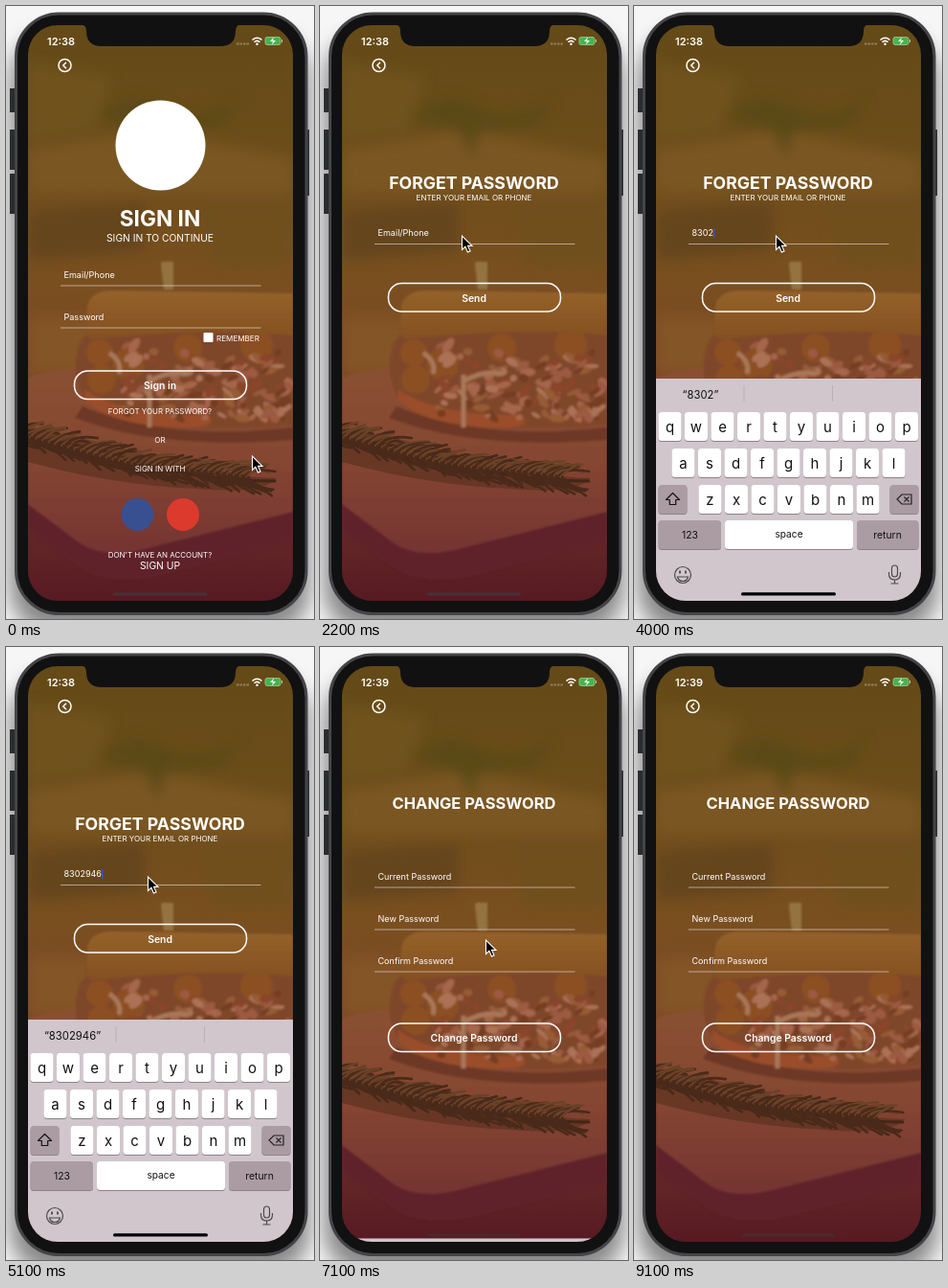
Recreate the animation shown at these times as an HTML page. Size 322 by 640 pixels, loop 9.2 s.

```html
<!DOCTYPE html>
<html lang="en">
<head>
<meta charset="utf-8">
<title>Sign in flow</title>
<style>
html, body { margin: 0; width: 100%; height: 100%; overflow: hidden; background: #f6f6f6; }
svg { display: block; width: 322px; height: 640px; font-family: Inter, Roboto, sans-serif; fill: #fff; }
.line { stroke: #fff; stroke-opacity: .5; fill: none; }
.button { fill: none; stroke: #fff; stroke-width: 1.5; }
.ink { fill: #111; }
.icon { fill: none; stroke: #4e484c; stroke-width: 1.2; }
</style>
</head>
<body>
<svg viewBox="0 0 322 640">
  <defs>
    <clipPath id="glass"><rect x="23" y="20" width="277" height="601" rx="31"/></clipPath>
    <linearGradient id="tone" x2="0" y2="1">
      <stop offset="0" stop-color="#644a18"/>
      <stop offset=".22" stop-color="#6c4d1a"/>
      <stop offset=".45" stop-color="#7a4f20"/>
      <stop offset=".62" stop-color="#7b4528"/>
      <stop offset=".85" stop-color="#672a29"/>
      <stop offset="1" stop-color="#571a22"/>
    </linearGradient>
    <linearGradient id="wood" x2="0" y2="1">
      <stop offset="0" stop-color="#8a5130"/>
      <stop offset=".5" stop-color="#854632"/>
      <stop offset="1" stop-color="#753433"/>
    </linearGradient>
    <linearGradient id="bun" x2="0" y2="1">
      <stop offset="0" stop-color="#94622a"/>
      <stop offset="1" stop-color="#845022"/>
    </linearGradient>
    <filter id="far" x="-50%" y="-50%" width="200%" height="200%"><feGaussianBlur stdDeviation="7"/></filter>
    <filter id="near" x="-20%" y="-20%" width="140%" height="140%"><feGaussianBlur stdDeviation="1.3"/></filter>
    <filter id="soft" x="-20%" y="-50%" width="140%" height="200%"><feGaussianBlur stdDeviation=".6"/></filter>
    <filter id="shade" x="-20%" y="-20%" width="140%" height="140%"><feGaussianBlur stdDeviation="11"/></filter>
    <g id="photo">
      <rect x="23" y="20" width="277" height="601" fill="url(#tone)"/>
      <g filter="url(#far)">
        <path d="M23 60L110 75L90 130L23 140Z" fill="#70531f"/>
        <path d="M23 150L150 130L300 160V195L23 195Z" fill="#7a5722"/>
        <path d="M95 115Q130 85 165 105T245 95L225 125L165 130L160 160L145 130Z" fill="#5a4918"/>
        <path d="M23 215L145 205V255L23 265Z" fill="#65451a"/>
        <path d="M200 205H300V270H215Z" fill="#70501f"/>
        <path d="M23 325H90V385H23Z" fill="#845528"/>
      </g>
      <g filter="url(#near)">
        <path d="M23 500H300V560L150 597Q105 603 80 588L23 548Z" fill="#602429"/>
        <path d="M23 388Q50 378 90 378L300 385V528L140 568Q100 577 76 560L23 520Z" fill="url(#wood)"/>
        <path d="M80 418Q170 455 300 440V453Q160 464 72 430Z" fill="#6e3828"/>
        <path d="M76 355Q82 338 110 338L300 330V437Q170 449 94 421Q64 395 76 355Z" fill="#7f472b"/>
        <path d="M82 400Q120 428 212 427Q222 440 194 440Q110 440 82 411Z" fill="#9a4d2a"/>
        <g id="filling"></g>
        <path d="M85 314Q88 297 112 297L300 300V344Q220 335 88 348Q83 340 85 314Z" fill="url(#bun)"/>
        <path d="M162 270Q162 266 167 267H175V296H165Z" fill="#957340"/>
      </g>
      <g id="herb" fill="none" stroke-linecap="round" filter="url(#soft)"></g>
    </g>
  </defs>

  <rect width="322" height="640" fill="#f6f6f6"/>
  <rect x="4" y="30" width="314" height="625" rx="46" fill="#000" opacity=".45" filter="url(#shade)"/>
  <path d="M4 86h7v25h-7zM4 129h7v42h-7zM4 175h7v42h-7zM312 129h5v69h-5z" fill="#2b2c2e"/>
  <rect x="10.5" y="8" width="303.5" height="626.500" rx="45" fill="#111" stroke="#444548" stroke-width="3"/>

  <g clip-path="url(#glass)">
    <g id="login"></g>
    <g id="forget"></g>
    <g id="change"></g>
    <rect id="homeDim" x="112" y="612.5" width="98" height="3" rx="1.5" fill="#433337"/>
    <g id="keyboard"></g>
  </g>

  <path d="M78 19Q84 20 84 26Q84 42 100 42H224Q240 42 240 26Q240 20 246 19Z" fill="#111"/>
  <text id="clock" x="43" y="41" font-size="11" font-weight="600"></text>
  <path d="M241 39.5h13" stroke="#fff" stroke-opacity=".3" stroke-width="2" stroke-dasharray="2.5 1"/>
  <path d="M257.500 35.500Q262.500 31 267.500 35.500M259.500 37.700Q262.500 35 265.500 37.700" fill="none" stroke="#fff" stroke-width="1.5"/>
  <circle cx="262.500" cy="39.800" r="1.200"/>
  <rect x="271" y="32.500" width="16" height="8" rx="2" fill="#43b54c" stroke="#b7d3a5" stroke-width=".7"/>
  <path d="M288.500 35v3" stroke="#b7d3a5"/>
  <path d="M280 32.500L276 37H279L278 40.500L282 36H279Z"/>
  <path id="pointer" d="M0 0V14.500L3.400 11.300L5.900 17L8.500 15.900L6 10.400H10.500Z" fill="#000" stroke="#fff" stroke-width="1.100"/>
</svg>
<script>
const $ = id => document.getElementById(id);
const PERIOD = 9200, WIDTH = 277, KB_HEIGHT = 232;
const DIGITS = "8302946", TYPE_START = 3300, TYPE_STEP = 230;

let seed = 7;
const rand = (a, b) => a + (b - a) * ((seed = seed * 16807 % 2147483647) / 2147483647);

const text = (x, y, size, str, extra = "") =>
  `<text x="${x}" y="${y}" font-size="${size}" ${extra}>${str}</text>`;
const mid = (y, size, str, weight = 400) =>
  text(161, y, size, str, `text-anchor="middle" font-weight="${weight}"`);
const field = (y, label, id = "") =>
  text(60.5, y - 8.5, 9.05, label, id && `id="${id}"`) + `<path class="line" d="M57 ${y}H266.500"/>`;
const button = (y, label) =>
  `<rect class="button" x="71.500" y="${y}" width="180" height="29.500" rx="14"/>` + mid(y + 19, 10.4, label, 600);
const back = `<circle class="button" cx="61.500" cy="62" r="6.500"/>
  <path class="button" d="M63 58.800L59.800 62L63 65.200"/>`;
const screen = (id, body) => $(id).innerHTML = `<use href="#photo"/>` + back + body;

function drawPhoto() {
  const tints = ["#965c35", "#a5664c", "#9c5a42", "#753c24", "#ab7257", "#8b4429"];
  let out = "";
  for (const [x, y, r] of [[98, 362, 14], [100, 390, 15], [128, 374, 17], [190, 357, 15], [262, 354, 17]])
    out += `<circle cx="${x}" cy="${y}" r="${r}" fill="#8b5024"/>`;
  for (let i = 0; i < 130; i++) {
    const x = rand(125, 298), y = rand(358, 430) + (x - 210) * .05;
    out += `<ellipse cx="${x}" cy="${y}" rx="${rand(3, 10)}" ry="${rand(2, 5)}" fill="${tints[i % 6]}"
      transform="rotate(${rand(-60, 60)} ${x} ${y})"/>`;
  }
  out += `<path d="M108 362Q122 372 118 384M150 385V440M150 392Q170 380 190 384" fill="none"
    stroke="#a8775a" stroke-width="5"/>`;
  $("filling").innerHTML = out;

  // Sprig: a soft dark body with long needles swept to the right
  out = `<path d="M23 441Q75 448 150 470T283 493Q270 510 200 504Q110 500 23 476Z" fill="#56301d" opacity=".6"/>
    <path d="M23 452Q80 456 140 476T281 496" stroke="#442616" stroke-width="3"/>`;
  for (let i = 0; i < 150; i++) {
    const u = i / 150, side = i % 2 ? 1 : -1;
    const x = 5 + 250 * u, y = 450 + 46 * u + 4 * Math.sin(6.3 * u - 1.6);
    out += `<path d="M${x} ${y}q${rand(6, 14)} ${side * rand(6, 13)} ${rand(20, 36)} ${4 + side * rand(7, 17)}"
      stroke="${i % 4 ? "#4a2a1a" : "#6a4227"}" stroke-width="2.600"/>`;
  }
  $("herb").innerHTML = out;
}

function drawScreens() {
  screen("login",
    `<circle cx="161.500" cy="145.500" r="47"/>` +
    mid(229.5, 22.7, "SIGN IN", 700) + mid(245.5, 10.25, "SIGN IN TO CONTINUE") +
    field(292, "Email/Phone") + field(336, "Password") +
    `<rect x="206.500" y="341" width="10" height="10" rx="1"/>` + text(220, 350, 8.1, "REMEMBER") +
    button(381, "Sign in") + mid(425.5, 7.95, "FORGOT YOUR PASSWORD?") +
    mid(455.5, 8, "OR") + mid(485.5, 7.95, "SIGN IN WITH") +
    `<circle cx="137.500" cy="531" r="17" fill="#38508f"/><circle cx="185" cy="531" r="17" fill="#dc3a2c"/>` +
    mid(575.5, 7.95, "DON'T HAVE AN ACCOUNT?") + mid(588, 10.3, "SIGN UP"));
  screen("forget",
    mid(190.5, 17.7, "FORGET PASSWORD", 700) + mid(203, 8, "ENTER YOUR EMAIL OR PHONE") +
    field(248.5, "Email/Phone", "entry") + button(289.5, "Send") +
    `<rect id="caret" y="232" width="1.500" height="10" fill="#3d51c8"/>`);
  screen("change",
    mid(169, 16.5, "CHANGE PASSWORD", 700) +
    field(251, "Current Password") + field(295, "New Password") + field(339, "Confirm Password") +
    button(393, "Change Password"));
}

function drawKeyboard() {
  const cap = (x, y, w, fill = "#fff", id = "") =>
    `<rect x="${x}" y="${y + 1}" width="${w}" height="30" rx="3.500" fill="#8d8287"/>
     <rect id="${id}" x="${x}" y="${y}" width="${w}" height="30" rx="3.500" fill="${fill}"/>`;
  const label = (x, y, size, str, cls = "ink") =>
    text(x, y, size, str, `class="${cls}" text-anchor="middle"`);
  const dark = "#ab9ca3";
  let out = `<rect x="23" y="389" width="277" height="232" fill="#d0c6cc"/>
    <path d="M115 396v17M207.500 396v17" stroke="#bbb0b6"/>`;
  [["QWERTYUIOP", 25.5, 424], ["ASDFGHJKL", 39.5, 462], ["ZXCVBNM", 67.5, 500]].forEach(([row, x0, y]) =>
    [...row].forEach((c, i) => {
      const x = x0 + 27.5 * i;
      out += cap(x, y, 24) + label(x + 12, y + 20.5, 15, c, "ink letter");
    }));
  out += cap(25.5, 500, 30, "#fff", "shiftCap") + cap(267.5, 500, 30, dark) +
    cap(25.5, 537, 65.5, dark) + cap(95, 537, 134) + cap(233, 537, 64.5, dark) +
    label(58.5, 556, 10.4, "123") + label(162, 555, 10.2, "space") + label(265, 555.5, 10.4, "return") +
    text(69.5, 410, 11.3, "", `id="hint" class="ink" text-anchor="middle"`) +
    `<path id="shift" d="M40.500 508.500L47.500 515.500H43.700V520.500H37.300V515.500H33.500Z" stroke="#111" stroke-width="1.200" stroke-linejoin="round"/>
    <path class="icon" style="stroke:#222" d="M275 515L280 510H290V520H280ZM282.500 512.500l5 5m0-5l-5 5"/>
    <g class="icon"><circle cx="51" cy="594" r="8.500"/><path d="M45.500 596h11q-1 4.500-5.500 4.500t-5.500-4.500z"/>
    <path d="M48 589.500v3m6-3v3" stroke-width="1.800"/>
    <rect x="269.500" y="584" width="6" height="12" rx="3"/><path d="M266.500 591v2q0 6 6 6t6-6v-2M272.500 599v4M268.500 603h8"/></g>
    <rect x="112" y="612.300" width="99" height="3.200" rx="1.600" fill="#000"/>`;
  $("keyboard").innerHTML = out;
}

const span = (t, a, b) => Math.min(1, Math.max(0, (t - a) / (b - a)));
const easeOut = u => 1 - (1 - u) ** 3;
const easeBoth = u => u * u * (3 - 2 * u);
const shiftTo = (el, x, y) => el.setAttribute("transform", `translate(${x} ${y})`);
const show = (el, on) => el.setAttribute("visibility", on ? "visible" : "hidden");

// Pointer moves: start, end, x, y
const MOVES = [[0, 320, 183.5, 427], [1150, 2050, 148.5, 240], [5350, 6150, 173.5, 306]];

let lastCount = -1;
function setTyped(n) {
  if (n === lastCount) return;
  lastCount = n;
  const typed = DIGITS.slice(0, n);
  $("entry").textContent = typed || "Email/Phone";
  $("hint").textContent = n ? `“${typed}”` : "";
  $("caret").setAttribute("x", 60.5 + (n ? $("entry").getComputedTextLength() : 0));
  document.querySelectorAll(".letter").forEach(el =>
    el.textContent = n ? el.textContent.toLowerCase() : el.textContent.toUpperCase());
  $("shift").setAttribute("fill", n ? "none" : "#111");
  $("shiftCap").setAttribute("fill", n ? "#ab9ca3" : "#fff");
}

function draw(t) {
  const first = easeOut(span(t, 380, 850)), second = easeOut(span(t, 6500, 7000));
  shiftTo($("login"), -.3 * WIDTH * first, 0);
  shiftTo($("forget"), WIDTH * (1 - first) - .3 * WIDTH * second, 0);
  shiftTo($("change"), WIDTH * (1 - second), 0);
  show($("login"), first < 1);
  show($("forget"), first > 0 && second < 1);
  show($("change"), second > 0);

  const up = easeOut(span(t, 2450, 2850)) - easeOut(span(t, 6800, 7200));
  shiftTo($("keyboard"), 0, KB_HEIGHT * (1 - up));
  show($("keyboard"), up > 0);

  const typing = t >= TYPE_START && t < 5000;
  setTyped(Math.min(DIGITS.length, Math.max(0, Math.floor((t - TYPE_START) / TYPE_STEP) + 1)));
  show($("caret"), t > 2450 && t < 6500 && (typing || t % 1000 < 600));

  let x = 257.5, y = 470;
  for (const [a, b, tx, ty] of MOVES) {
    const u = easeBoth(span(t, a, b));
    x += (tx - x) * u;
    y += (ty - y) * u;
  }
  shiftTo($("pointer"), x, y);
  show($("pointer"), t < 7900);
  $("clock").textContent = t < 6300 ? "12:38" : "12:39";
  $("homeDim").setAttribute("opacity", t < 6500 ? 1 : .55);
}

drawPhoto();
drawScreens();
drawKeyboard();
const start = performance.now();
function tick() {
  draw((performance.now() - start) % PERIOD);
  requestAnimationFrame(tick);
}
tick();
</script>
</body>
</html>
```
